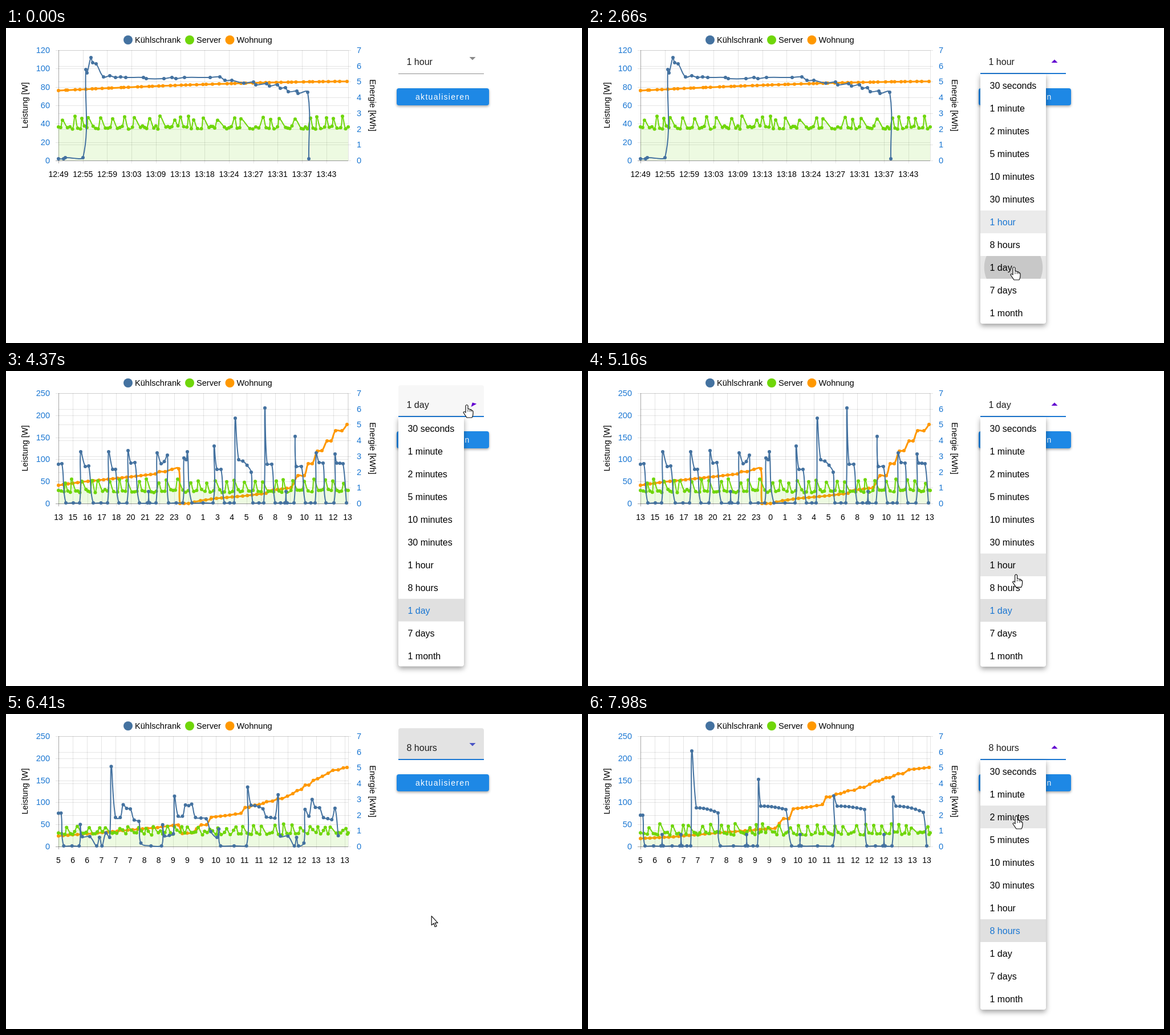
Animation, 1010 px wide and 554 px high, one loop 8000 ms. Source, as an HTML page with a canvas:

```html
<!DOCTYPE html>
<html lang="de">
<head>
<meta charset="utf-8">
<title>Energie</title>
<style>
html, body { margin: 0; width: 100%; height: 100%; overflow: hidden; background: #fff; }
canvas { display: block; }
</style>
</head>
<body>
<canvas id="stage" width="1010" height="554"></canvas>
<script>
const ctx = document.getElementById('stage').getContext('2d');
const LOOP = 8000;
const FONT = '"Liberation Sans", Arial, sans-serif';
const BLUE = '#4472a0', GREEN = '#6fd60a', ORANGE = '#ff9800', ACCENT = '#1976d2';
const LEFT = 92, RIGHT = 600, TOP = 39, BOTTOM = 233, IDLE = 232;
const ITEMS = ['30 seconds', '1 minute', '2 minutes', '5 minutes', '10 minutes', '30 minutes',
  '1 hour', '8 hours', '1 day', '7 days', '1 month'];

const clamp = v => Math.max(0, Math.min(1, v));
const ramp = (t, start, len) => clamp((t - start) / len);
const noise = i => { const s = Math.sin(i * 12.9898) * 43758.5; return s - Math.floor(s); };
const wobble = (i, size) => (noise(i) * 2 - 1) * size;

// Dots along a polyline, about gap pixels apart
function along(knots, gap) {
  const out = [knots[0]];
  knots.slice(1).forEach(([x, y], i) => {
    const [px, py] = knots[i], n = Math.max(1, Math.round((x - px) / gap));
    for (let k = 1; k <= n; k++) out.push([px + (x - px) * k / n, py + (y - py) * k / n]);
  });
  return out;
}

// Load peaks with a few low readings between neighbours
function peaks(xs, high, low) {
  const out = [];
  xs.forEach((x, i) => {
    out.push([x, i && x < RIGHT ? high + wobble(i, 4) : low - 1]);
    const gap = xs[i + 1] - x, n = Math.min(4, Math.round(gap / 7));
    for (let k = 0; k < n; k++) {
      const u = n > 1 ? .4 + .4 * k / (n - 1) : .55;
      out.push([x + gap * u, low + wobble(x + k, 3)]);
    }
  });
  return out;
}

// Compressor cycles: spike, plateau from (sx, sy) to (ex, ey), drop to idle
function cooling(first, cycles, gap) {
  const out = [...first];
  for (const [x, y, sx, sy, ex, ey, end] of cycles) {
    const last = out[out.length - 1][0];
    if (x - last > 16) out.push([(x + last) / 2, IDLE]);
    out.push([x - 2, IDLE], [x, y]);
    if (sx) {
      const n = Math.max(1, Math.round((ex - sx) / gap));
      for (let k = 0; k <= n; k++) out.push([sx + (ex - sx) * k / n, sy + (ey - sy) * (k / n) ** 2]);
    }
    out.push([end || x + 2, IDLE]);
  }
  return out;
}

const hour = {
  max: 120, step: 20, gap: 42.7,
  labels: '12:49 12:55 12:59 13:03 13:09 13:13 13:18 13:24 13:27 13:31 13:37 13:43'.split(' '),
  fridge: [[92,230], [101,230], [104,228], [135,228], [140,73], [142,79], [149,52], [152,61], [158,63],
    [171,86], [182,84], [192,87], [201,86], [210,87], [241,87], [246,89], [277,89], [291,87], [298,89],
    [313,87], [358,87], [375,86], [384,92], [396,92], [417,97], [434,95], [438,100], [457,98], [462,102],
    [476,100], [481,106], [490,105], [495,112], [510,111], [512,115], [529,113], [531,230]],
  server: peaks([92,99,121,133,144,166,187,208,225,252,270,296,306,320,329,346,371,401,412,451,464,479,
    507,534,545,562,574,590,600], 159, 175),
  flat: Array.from({ length: 53 }, (_, i) => {
    const x = LEFT + 506 * i / 52 + (i % 52 ? wobble(i, 4) : 0);
    return [x, 94 + 16 * Math.pow((598 - x) / 506, 1.6)];
  })
};

const day = {
  max: 250, step: 50, gap: 25.35,
  labels: '13 15 16 17 18 20 21 22 23 0 1 3 4 5 6 8 9 10 11 12 13'.split(' '),
  fridge: cooling([[92,164], [98,163], [105,IDLE]], [
    [131,142,139,168,145,167,153], [180,142,187,173,192,173,198], [214,140,219,162,226,161,234], [250,212],
    [265,144,272,163,283,148,285], [312,153,316,156,318,142,326], [365,132,370,173,377,173,383],
    [402,83,408,156,430,178,433], [454,65,458,164,466,164,472], [491,212], [507,115,509,168,518,168,525],
    [544,144,549,161,556,162,561], [577,146,580,162,591,163,597]], 7),
  server: peaks([92,104,115,133,151,161,182,199,212,234,246,268,281,301,324,337,352,367,387,400,418,437,
    450,474,486,503,523,540,560,573,592,600], 194, 211),
  flat: along([[92,201], [134,195], [163,192], [228,185], [262,181], [269,177], [279,177], [291,173],
    [303,172], [305,233], [320,233], [341,228], [369,224], [415,220], [456,215], [460,211], [500,205],
    [512,184], [523,184], [530,163], [537,163], [546,141], [554,140], [563,123], [570,123], [578,105],
    [589,105], [598,94]], 8.5)
};

const eight = {
  max: 250, step: 50, gap: 25.1,
  labels: '5 6 6 7 7 7 8 8 9 9 9 10 10 11 11 12 12 12 13 13 13'.split(' '),
  fridge: cooling([[92,178], [96,178], [100,IDLE]], [
    [130,212], [163,212], [182,65,190,165,228,174,232], [278,212], [299,115,303,162,347,168,357],
    [372,212], [431,144,437,162,485,168,489], [519,212], [535,146,540,162,588,173,594]], 6.5),
  server: peaks([92,107,126,148,167,176,201,215,234,246,258,284,295,306,316,335,355,369,385,402,414,433,
    447,471,487,501,515,532,545,558,567,596,600], 197, 210),
  flat: along([[92,219], [150,216], [205,211], [267,206], [328,201], [343,184], [352,184], [360,167],
    [391,163], [411,159], [418,146], [424,146], [435,141], [443,140], [456,135], [467,134], [477,129],
    [484,129], [504,118], [510,118], [523,112], [529,112], [544,105], [552,105], [563,98], [598,94]], 8.5)
};

const LOADS = [{ t: 2893, from: hour, to: day }, { t: 6120, from: day, to: eight }];
const SPINS = [[2790, 2893], [5860, 6120]];
const MENUS = [[1080, 2730], [4262, 5810], [7530, 9000]];
const CLICKS = [{ t: 2590, x: 746, row: 8 }, { t: 5720, x: 744, row: 7 }];
const POINTER = [[100,893,455], [330,740,50], [500,740,50], [760,808,54], [1730,808,54], [2360,747,420],
  [3440,747,420], [3900,808,59], [4700,808,59], [5230,742,402], [5380,742,402], [5550,744,391],
  [6330,744,391], [7040,763,78], [7340,808,56], [7810,808,56], [7970,751,179]];

function track(keys, t) {
  const n = keys.findIndex(k => k[0] > t);
  if (n === 0) return keys[0].slice(1);
  if (n < 0) return keys[keys.length - 1].slice(1);
  const a = keys[n - 1], b = keys[n], u = (t - a[0]) / (b[0] - a[0]);
  return a.slice(1).map((v, i) => v + (b[i + 1] - v) * u);
}

function text(s, x, y, size, color, align = 'left') {
  ctx.font = `${size}px ${FONT}`;
  ctx.fillStyle = color;
  ctx.textAlign = align;
  ctx.textBaseline = 'alphabetic';
  ctx.fillText(s, x, y);
}

function disc(x, y, r, color) {
  ctx.fillStyle = color;
  ctx.beginPath();
  ctx.arc(x, y, r, 0, 7);
  ctx.fill();
}

function line(x1, y1, x2, y2, color) {
  ctx.strokeStyle = color;
  ctx.lineWidth = 1;
  ctx.beginPath();
  ctx.moveTo(x1, y1);
  ctx.lineTo(x2, y2);
  ctx.stroke();
}

function box(x, y, w, h, r, color, shadow) {
  ctx.save();
  if (shadow) [ctx.shadowColor, ctx.shadowOffsetY, ctx.shadowBlur] = shadow;
  ctx.fillStyle = color;
  ctx.beginPath();
  ctx.roundRect(x, y, w, h, r);
  ctx.fill();
  ctx.restore();
}

function turned(s, x, y, angle) {
  ctx.save();
  ctx.translate(x, y);
  ctx.rotate(angle);
  text(s, 0, 5, 14.6, '#000', 'center');
  ctx.restore();
}

function spline(p) {
  const fit = y => Math.max(TOP, Math.min(BOTTOM, y));
  const ctl = p.map((c, i) => {
    const a = p[i - 1] || c, b = p[i + 1] || c;
    const d1 = Math.hypot(c[0] - a[0], c[1] - a[1]), d2 = Math.hypot(b[0] - c[0], b[1] - c[1]);
    const k = 0.4 / (d1 + d2 || 1), dx = b[0] - a[0], dy = b[1] - a[1];
    return [c[0] - k * d1 * dx, fit(c[1] - k * d1 * dy), c[0] + k * d2 * dx, fit(c[1] + k * d2 * dy)];
  });
  const path = new Path2D();
  path.moveTo(...p[0]);
  for (let i = 1; i < p.length; i++)
    path.bezierCurveTo(ctl[i - 1][2], ctl[i - 1][3], ctl[i][0], ctl[i][1], ...p[i]);
  return path;
}

function series(p, color, width, fill) {
  const path = spline(p);
  if (fill) {
    const area = new Path2D(path);
    area.lineTo(p[p.length - 1][0], BOTTOM);
    area.lineTo(p[0][0], BOTTOM);
    ctx.fillStyle = fill;
    ctx.fill(area);
  }
  ctx.strokeStyle = color;
  ctx.lineWidth = width;
  ctx.lineJoin = 'round';
  ctx.stroke(path);
  for (const [x, y] of p) disc(x, y, 3, color);
}

function chart(t) {
  const load = LOADS.filter(l => t >= l.t).pop();
  const now = load ? load.to : hour;
  const rest = load ? Math.pow(1 - ramp(t, load.t, 1000), 4) : 0;
  const morph = key => now[key].map((p, i) => {
    const old = load && load.from[key][i];
    return old && rest ? p.map((v, j) => v + (old[j] - v) * rest) : p;
  });
  const grid = 'rgba(0,0,0,.1)', axis = 'rgba(0,0,0,.35)';

  [['Kühlschrank', 214, BLUE], ['Server', 322, GREEN], ['Wohnung', 392.5, ORANGE]].forEach(([s, x, c]) => {
    disc(x, 21, 8, c);
    text(s, x + 12, 26, 14.6, '#000');
  });
  turned('Leistung [W]', 33, 136, -Math.PI / 2);
  turned('Energie [kWh]', 643, 136, Math.PI / 2);

  const rows = now.max / now.step, height = BOTTOM - TOP;
  for (let i = 0; i <= rows; i++) {
    const y = BOTTOM - i * height / rows, py = Math.round(y) + .5;
    line(LEFT - 5, py, RIGHT, py, i ? grid : axis);
    text(i * now.step, 77, y + 5, 14.6, ACCENT, 'right');
  }
  for (let i = 0; i <= 7; i++) {
    const y = BOTTOM - i * height / 7, py = Math.round(y) + .5;
    line(LEFT, py, RIGHT + 5, py, grid);
    text(i, 615, y + 5, 14.6, ACCENT);
  }
  now.labels.forEach((s, i) => {
    const x = LEFT + i * now.gap, px = Math.round(x) + .5;
    line(px, TOP, px, BOTTOM + 5, i ? grid : axis);
    text(s, x, 262, 14, '#000', 'center');
  });
  line(RIGHT + .5, TOP, RIGHT + .5, BOTTOM, grid);

  series(morph('flat'), ORANGE, 3);
  series(morph('server'), GREEN, 2, 'rgba(111,214,10,.12)');
  series(morph('fridge'), BLUE, 2);
}

function spinner(t) {
  const s = SPINS.find(([a, b]) => t >= a && t < b);
  if (!s) return;
  disc(339, 112, 24, '#c9c9c9');
  const a = -0.9 + (t - 5940) / 220;
  ctx.strokeStyle = '#1e88e5';
  ctx.lineWidth = 3;
  ctx.beginPath();
  ctx.arc(339, 112, 10, a, a + .5);
  ctx.stroke();
}

function select(t, value) {
  // Hover and focus tint, cleared while the menu is open
  let shade = 255 - 10 * ramp(t, 250, 80) - 18 * ramp(t, 760, 140);
  for (const [a, b] of MENUS) shade += 28 * (ramp(t, a, 150) - ramp(t, b, 100));
  const focus = t > 850;
  box(688, 25, 150, 55, [4, 4, 0, 0], `rgb(${shade},${shade},${shade})`);
  ctx.fillStyle = focus ? ACCENT : '#8e8e8e';
  ctx.fillRect(688, focus ? 79 : 80, 150, focus ? 2 : 1);
  text(value, 702.5, 65, 16, '#1c1c1c');

  let up = 0;
  for (const [a, b] of MENUS) up += ramp(t, a, 130) - ramp(t, b + 190, 150);
  ctx.save();
  ctx.translate(818, 56);
  ctx.rotate(Math.PI * up);
  ctx.fillStyle = !focus ? '#8a8a8a' : up > .5 ? '#6200d0' : '#4a55c4';
  ctx.beginPath();
  ctx.moveTo(-5.5, -5);
  ctx.lineTo(5.5, -5);
  ctx.lineTo(0, .5);
  ctx.fill();
  ctx.restore();
}

function button(hover) {
  box(685, 106, 162, 30, 4, hover ? '#3392e7' : '#1e88e5', ['rgba(0,0,0,.35)', 2, 4]);
  ctx.letterSpacing = '1.3px';
  text('aktualisieren', 718, 126, 14, '#fff');
  ctx.letterSpacing = '0px';
}

function menu(t, span, value, x, y) {
  const open = ramp(t, span[0], 120), fade = 1 - ramp(t, span[1], 75);
  const scale = 1 - .2 * Math.pow(1 - open, 2.2);
  const inside = x > 688 && x < 803;
  ctx.save();
  ctx.globalAlpha = Math.min(1, open * 4) * fade;
  ctx.translate(688, 81);
  ctx.scale(scale, scale);
  box(0, 0, 115, 439, [0, 0, 4, 4], '#fff', ['rgba(0,0,0,.38)', 4, 10]);
  ITEMS.forEach((s, i) => {
    const top = i * 40, on = s === value;
    if (on) ctx.fillStyle = value === '1 hour' ? '#ebebeb' : '#e0e0e0';
    else if (inside && y >= 81 + top && y < 121 + top) ctx.fillStyle = '#e6e6e6';
    else ctx.fillStyle = '#fff';
    ctx.fillRect(0, top, 115, i < 10 ? 40 : 36);
    const hit = CLICKS.find(c => c.row === i && t >= c.t && t < c.t + 300);
    if (hit) {
      ctx.save();
      ctx.beginPath();
      ctx.rect(0, top, 115, 40);
      ctx.clip();
      disc(hit.x - 688, top + 20, 30 + .3 * (t - hit.t), 'rgba(0,0,0,.13)');
      ctx.restore();
    }
    text(s, 16.5, top + 26, 16, on ? ACCENT : '#000');
  });
  ctx.restore();
}

const HAND = new Path2D('M-2 2Q0 -1 2 2V8Q4 7 6 9Q8 8 8 10Q11 10 11 13V16Q11 20 9 23H0Q-2 20 -6 14Q-5 11 -2 14Z');
const ARROW = new Path2D('M0 0V16L4 13L6 19L9 18L6 12H11Z');

function pointer(x, y, hand) {
  const shape = hand ? HAND : ARROW;
  ctx.save();
  ctx.translate(x, y);
  ctx.fillStyle = '#fff';
  ctx.fill(shape);
  ctx.strokeStyle = '#111';
  ctx.lineWidth = 1.2;
  ctx.stroke(shape);
  if (hand) for (const k of [2, 5.5, 8.3]) line(k, 9.5, k, 12.5, '#111');
  ctx.restore();
}

function draw(t) {
  ctx.fillStyle = '#fff';
  ctx.fillRect(0, 0, 1010, 554);
  const [x, y] = track(POINTER, t);
  const pick = (a, b) => t < a ? '1 hour' : t < b ? '1 day' : '8 hours';
  const span = MENUS.find(([a, b]) => t >= a && t < b + 75);
  const within = (x0, y0, x1, y1) => x >= x0 && x < x1 && y >= y0 && y < y1;
  const onButton = !span && within(685, 106, 847, 136);

  chart(t);
  spinner(t);
  select(t, pick(2720, 5800));
  button(onButton);
  if (span) menu(t, span, pick(2810, 5890), x, y);
  if (t >= 100) pointer(x, y, onButton || within(688, 25, 838, 81) || (span && within(688, 81, 803, 520)));
}

const start = performance.now();
function tick() {
  draw((performance.now() - start) % LOOP);
  requestAnimationFrame(tick);
}
tick();
</script>
</body>
</html>
```
